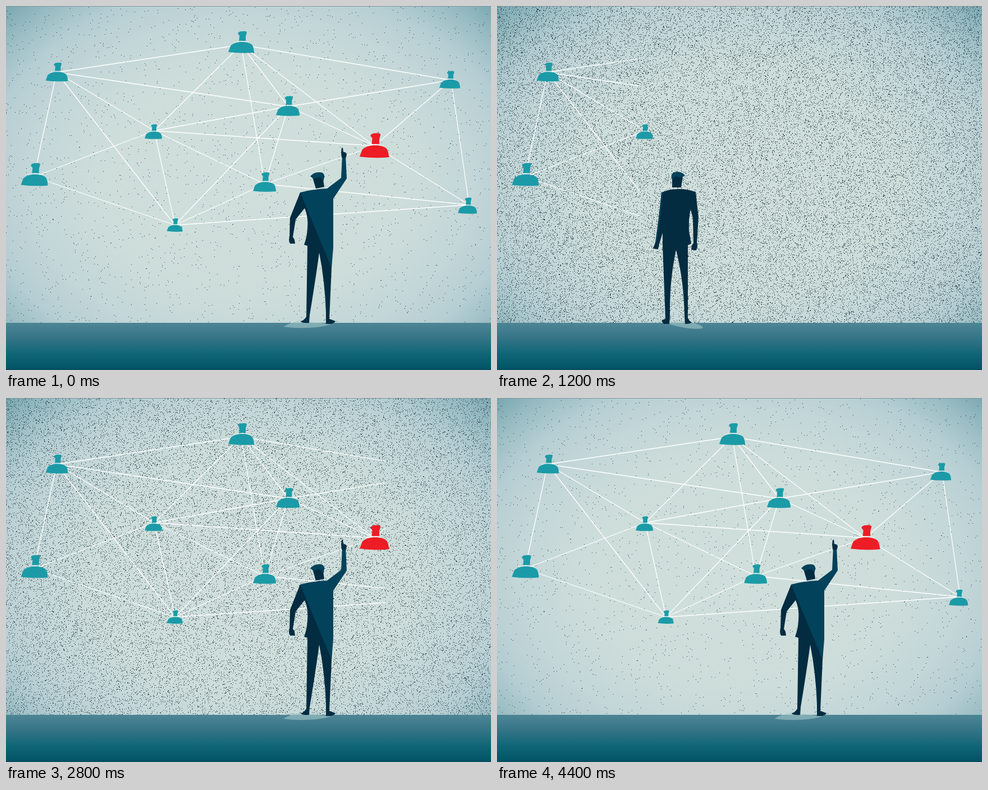
Recreate the animation shown at these times as an HTML page with a canvas. Size 864 px wide and 648 px high, loop 5.4 s.

```html
<!DOCTYPE html>
<html lang="en">
<head>
<meta charset="utf-8">
<title>Network</title>
<style>
  html, body { margin: 0; width: 100%; height: 100%; overflow: hidden; }
  canvas { display: block; width: 100vw; height: 100vh; }
</style>
</head>
<body>
<canvas id="stage" width="864" height="648"></canvas>
<script>
const W = 864, H = 648, FLOOR = 564, LOOP = 5400, STEP = 100;
const NAVY = '#032c41', SLATE = '#02425a', TEAL = '#1b9ba7', RED = '#ee1c24';
const ctx = document.getElementById('stage').getContext('2d');

const clamp = (v, a, b) => Math.min(b, Math.max(a, v));
const lerp = (a, b, k) => a + (b - a) * k;

// Each node: body centre x, bottom y, body width, line anchor x, y
const nodes = [
  [90.5, 134.5, 39.5, 90, 118], [50.5, 320.5, 48, 50, 304],
  [262.5, 237, 31, 264, 222], [300.5, 402, 28, 301, 390],
  [419, 84, 46, 419, 69], [460.5, 331, 41, 461, 317],
  [502, 196, 42, 503, 179], [656, 270.5, 52, 656, 249],
  [790.5, 147, 37, 793, 132], [822, 370, 34, 825, 354]
];
const RED_NODE = 7;

// For every node, the later nodes it is linked to
const links = ['14623', '23', '46753', '659', '5678', '679', '78', '89', '9'];

const nodeBody = new Path2D('M-23-2L-19-13C-14-18-7-20 1-20C10-20 17-18 20-14C22-10 23-6 23-1Q0 1-23-2Z');
const nodeHead = new Path2D('M-4-22L-3-31L-6-35Q-5-39 2-39Q9-40 10-37Q9-33 8-30L8-22Z');

// Figure layers: colour and outline, painted in order
const shape = (fill, d) => ({ fill, path: new Path2D(d) });
const SHADE = 'rgba(163,199,200,.6)';

const walker = [
  shape(SHADE, 'M184 563Q215 557 240 567Q250 571 247 574Q226 577 190 567Z'),
  shape(NAVY, `M174 332Q203 320 235 331L240 376L237 422L238 428L236 435L227 434L228 426L231 422
    L230 378L226 362Q222 378 223 400L227 423L221 426L221 555Q223 561 228 563Q226 566 216 566L215 552
    Q214 490 200 434Q188 490 189 552L188 566L178 566Q174 562 175 559L181 557L176 426L176 404
    L170 424L168 433L159 432L163 421Q169 380 174 332Z`),
  shape(SLATE, 'M174 332L176 331Q173 375 166 418L164 419Q170 378 174 332Z'),
  shape(NAVY, 'M193 303L212 303L209 323L193 323Z'),
  shape(SLATE, 'M192 306Q190 296 202 295Q211 295 216 302Q211 306 202 304Q196 303 193 308Z')
];

const pointer = [
  shape(SHADE, 'M494 571Q508 562 528 560L580 567Q540 577 494 571Z'),
  shape(NAVY, `M524 332L506 377L505 411L504 416L506 423L515 423L514 416L511 411L516 380L532 360
    Q539 376 537 396Q536 412 531 425L537 427L535 553Q531 560 525 561Q526 565 540 564L541 550
    Q551 490 558 439Q568 490 570 545L570 566L579 566Q586 564 587 561L576 557L580 466L583 343L560 330Z`),
  shape(SLATE, 'M524 332Q545 326 572 325L597 306L599 266L605 266L607 307L583 343L583 430L580 466Z'),
  shape(NAVY, 'M598 270L597 261L598 253L600 252L601 260Q607 260 607 265L605 271Z'),
  shape(NAVY, 'M546 305L564 302L567 322L552 325Z'),
  shape(SLATE, 'M542 303Q549 295 559 296Q568 296 567 305L565 313Q563 304 555 305L548 308Z')
];

// Seeded grain, kept in order so a smaller count is a subset
const SPARSE = 2300, MEDIUM = 30000, DENSE = 46000;
let seed = 7;
function rand() {
  seed = seed + 0x6D2B79F5 | 0;
  let n = Math.imul(seed ^ seed >>> 15, 1 | seed);
  n = n + Math.imul(n ^ n >>> 7, 61 | n) ^ n;
  return ((n ^ n >>> 14) >>> 0) / 4294967296;
}
const grain = Array.from({ length: DENSE }, () => [
  Math.floor(rand() * W), 1 + Math.floor(rand() * (FLOOR - 1))
]);

function stops(gradient, list) {
  list.forEach(([at, color]) => gradient.addColorStop(at, color));
  return gradient;
}
const wall = stops(ctx.createRadialGradient(0, 0, 0, 0, 0, 1), [
  [0, '#d0dfdc'], [0.45, '#cdddda'], [0.65, '#c3d6d8'],
  [0.78, '#b5ced3'], [0.9, '#97bbc2'], [1, '#76a5af']
]);
const ground = stops(ctx.createLinearGradient(0, FLOOR, 0, H), [
  [0, '#4e8595'], [0.35, '#327385'], [0.65, '#106678'], [0.95, '#035567'], [1, '#034d5f']
]);

function drawRoom() {
  ctx.save();
  ctx.translate(436, 312);
  ctx.scale(611, 452);
  ctx.fillStyle = wall;
  ctx.fillRect(-1, -1, 2, 2);
  ctx.restore();
  ctx.fillStyle = '#7f979d';
  ctx.fillRect(0, 0, W, 1);
  ctx.fillStyle = ground;
  ctx.fillRect(0, FLOOR, W, H - FLOOR);
}

function drawGrain(count) {
  ctx.fillStyle = 'rgba(18,42,52,.85)';
  for (let i = 0; i < count; i++) ctx.fillRect(...grain[i], 1, 1);
}

function drawLinks(edge) {
  ctx.save();
  ctx.beginPath();
  ctx.rect(0, 0, edge, FLOOR);
  ctx.clip();
  ctx.beginPath();
  links.forEach((ends, i) => {
    for (const j of ends) {
      ctx.moveTo(nodes[i][3], nodes[i][4]);
      ctx.lineTo(nodes[j][3], nodes[j][4]);
    }
  });
  ctx.strokeStyle = '#fff';
  ctx.lineWidth = 1.3;
  ctx.stroke();
  ctx.restore();
}

function drawNode([x, y, w], i) {
  ctx.save();
  ctx.translate(x, y);
  ctx.scale(w / 46, w / 46);
  ctx.lineWidth = 1.2;
  ctx.strokeStyle = 'rgba(255,255,255,.55)';
  ctx.beginPath();
  ctx.moveTo(-14, -19);
  ctx.quadraticCurveTo(1, -23, 15, -19);
  ctx.stroke();
  ctx.fillStyle = i === RED_NODE ? RED : TEAL;
  ctx.fill(nodeBody);
  ctx.fill(nodeHead);
  ctx.restore();
}

function drawFigure(layers, dx) {
  ctx.save();
  ctx.translate(dx, 0);
  for (const { fill, path } of layers) {
    ctx.fillStyle = fill;
    ctx.fill(path);
  }
  ctx.restore();
}

function draw(t) {
  const whole = t < STEP || t >= 4400;
  // Progress pauses between 500 and 800 ms
  const u = whole ? 3500 : clamp(t <= 500 ? t + 300 : Math.max(t, 800), 0, 3500);
  const edge = whole ? W : 148 + 0.264 * (u - 800);
  const thin = lerp(DENSE, MEDIUM, clamp((u - 800) / 2700, 0, 1));
  const count = whole ? SPARSE : lerp(thin, SPARSE, clamp((t - 3600) / 800, 0, 1));

  drawRoom();
  drawGrain(Math.round(count));
  drawLinks(edge);
  nodes.forEach((n, i) => { if (edge >= n[0] - 16) drawNode(n, i); });
  if (whole || t >= 2700) drawFigure(pointer, 0);
  else drawFigure(walker, Math.min(314, 0.2975 * (u - 800)));
}

let last = -1;
const start = performance.now();
function tick() {
  const t = (performance.now() - start) % LOOP;
  const now = Math.floor(t / STEP) * STEP;
  if (now !== last) draw(last = now);
  requestAnimationFrame(tick);
}
tick();
</script>
</body>
</html>
```
